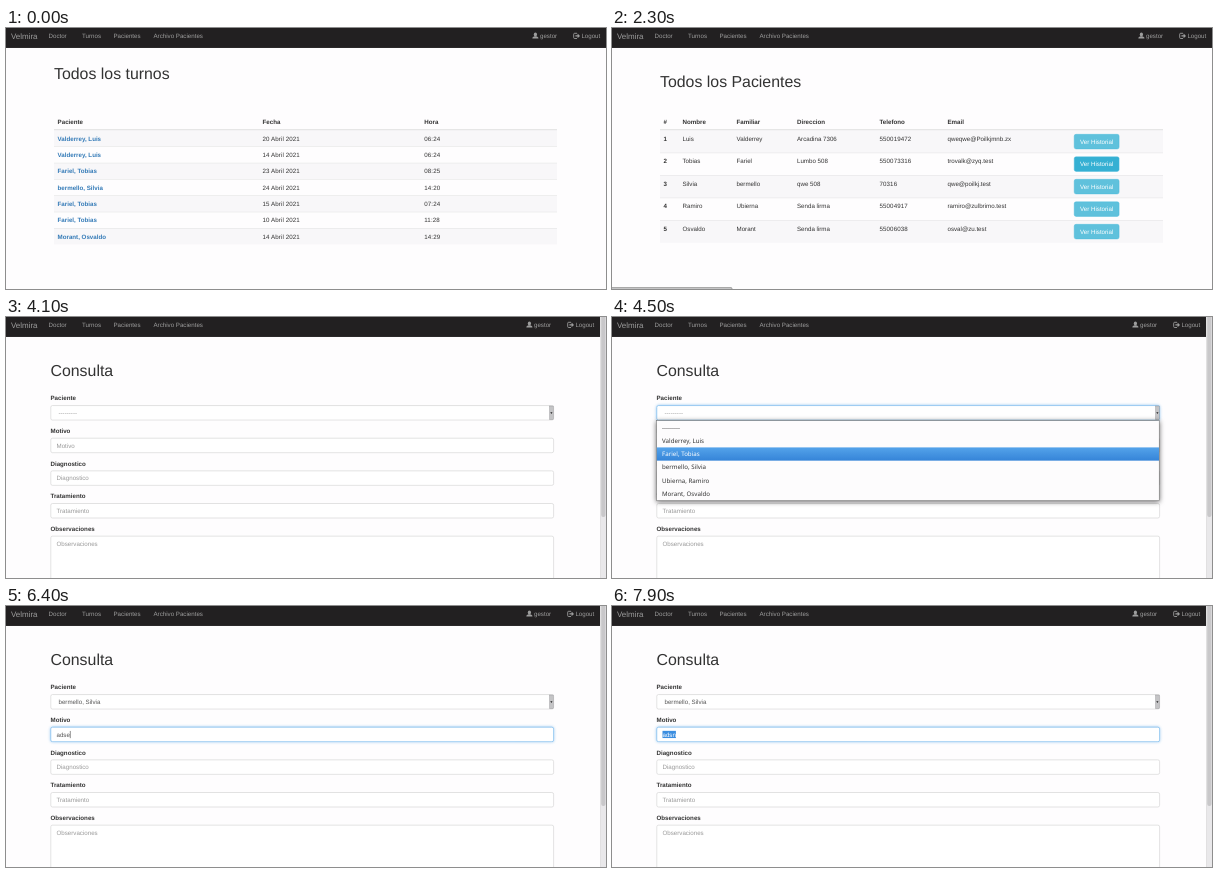
Write an HTML page that moves like this. It is 600 px wide and 261 px high and loops after 8000 ms.

```html
<!DOCTYPE html>
<html lang="es">
<head>
<meta charset="utf-8">
<title>Turnos</title>
<style>
html, body { margin: 0; width: 100%; height: 100%; overflow: hidden; background: #fefdfe; }
svg { display: block; width: 100%; height: 100%; }
text { font: 6.18px "Liberation Sans", Arial, sans-serif; fill: #333; white-space: pre; text-rendering: geometricPrecision; }
.num { letter-spacing: .1px; }
.h1 { font-size: 15.88px; }
.h2 { font-size: 13.2px; }
.b { font-weight: bold; }
.link { font-weight: bold; fill: #337ab7; }
.nav { fill: #9d9d9d; }
.brand { font-size: 7.94px; fill: #9d9d9d; }
.w { fill: #fff; }
.ph { fill: #999; }
.val { fill: #555; }
.pop { font-family: "Noto Sans", sans-serif; }
.shadow { filter: drop-shadow(0 1px 2.4px rgba(0,0,0,.6)); }
</style>
</head>
<body>
<svg id="stage" viewBox="0 0 600 261" preserveAspectRatio="none"></svg>
<script>
const LOOP = 8000, ROW = 16.32, MAX_SCROLL = 80;
const stage = document.getElementById('stage');
const pen = document.createElement('canvas').getContext('2d');
pen.font = '618px "Liberation Sans", Arial, sans-serif';
const widthOf = s => pen.measureText(s).width / 100;

const people = [
  { first: 'Luis', last: 'Valderrey', street: 'Arcadina 7306', phone: '550019472', mail: 'qweqwe@Poilkjmnb.zx' },
  { first: 'Tobias', last: 'Fariel', street: 'Lumbo 508', phone: '550073316', mail: 'trovalk@zyq.test' },
  { first: 'Silvia', last: 'bermello', street: 'qwe 508', phone: '70316', mail: 'qwe@poilkj.test' },
  { first: 'Ramiro', last: 'Ubierna', street: 'Senda lirma', phone: '55004917', mail: 'ramiro@zulbrimo.test' },
  { first: 'Osvaldo', last: 'Morant', street: 'Senda lirma', phone: '55006038', mail: 'osval@zu.test' }
];
const fullName = p => `${p.last}, ${p.first}`;

// Last entry of [time, value] pairs that has started
const at = (t, steps) => steps.reduce((v, s) => t >= s[0] ? s : v);
const clamp = v => Math.max(0, Math.min(1, v));
const ease = v => (v = clamp(v), v * v * (3 - 2 * v));

const rect = (x, y, w, h, fill, more = '') =>
  `<rect x="${x}" y="${y}" width="${w}" height="${h}" fill="${fill}" ${more}/>`;
const text = (x, y, s, cls = '') =>
  `<text x="${x}" y="${y}" class="${cls}${/^\d/.test(s) ? ' num' : ''}">${s}</text>`;

const colours = {
  info: ['#5fc1dc', '#46b8da', '#35b0d3'],
  green: ['#47ae47', '#3fa23f', '#3b983b'],
  amber: ['#e9a94e', '#e6a040', '#e09a36'],
  red: ['#cd3d4b', '#c53441', '#b93440'],
  blue: ['#377bb6', '#2e6da4', '#286090']
};
function button(x, y, w, label, kind, hover) {
  const [fill, edge, dark] = colours[kind];
  return rect(x + .22, y + .22, w - .44, 14.6, hover ? dark : fill, `rx="1.8" stroke="${edge}" stroke-width=".44"`) +
    `<text x="${x + w / 2}" y="${y + 9.6}" class="w" text-anchor="middle">${label}</text>`;
}

function navbar(hover, width) {
  const items = [['Doctor', 42.5], ['Turnos', 76], ['Pacientes', 107.5], ['Archivo Pacientes', 147.5]];
  return rect(0, -100, width, 119.8, '#222021') + rect(0, 19.4, width, .5, '#080808') +
    text(5, 10.6, 'Velmira', 'brand') +
    items.map(([s, x]) => text(x, 10.1, s, s === hover ? 'w' : 'nav')).join('') +
    `<g transform="translate(${width - 600})" fill="#9d9d9d">
      <ellipse cx="529.4" cy="6.5" rx="1.6" ry="2"/>
      <path d="M526.4 10.6v-.9q.1-.7 2.1-1.4h1.8q2 .7 2.1 1.4v.9z"/>
      ${text(534, 10.1, 'gestor', 'nav')}
      <path d="M571 5.3h-2.4q-.9 0-.9.9v3.4q0 .9.9.9h2.4" fill="none" stroke="#9d9d9d" stroke-width=".9"/>
      <path d="M569.4 7.2h2.2v-1.6l2.4 2.3-2.4 2.3v-1.6h-2.2z"/>
      ${text(575.4, 10.1, 'Logout', 'nav')}
    </g>`;
}

// Striped table: heading labels sit at the column positions
function table(top, rowH, cols, heads, rows) {
  const head = heads.map((s, i) => text(cols[i], top - 6.5, s, 'b')).join('');
  const body = rows.map((cells, r) => {
    const y = top + r * rowH;
    return (r % 2 ? '' : rect(48, y, 503, rowH, '#f8f7f9')) +
      (r ? rect(48, y, 503, .44, '#ddd') : '') +
      cells.map((s, i) => text(cols[i], y + 10.5, s, i ? '' : rowH === ROW ? 'link' : 'b')).join('');
  }).join('');
  return head + body + rect(48, top - .9, 503, .9, '#ddd');
}

const statusBar = w => rect(-2, 259.6, w + 2, 4, '#c9c9ca', 'rx="1" stroke="#777" stroke-width=".6"');

function appointments(t) {
  const list = [[0, 20, '06:24'], [0, 14, '06:24'], [1, 23, '08:25'], [2, 24, '14:20'],
    [1, 15, '07:24'], [1, 10, '11:28'], [4, 14, '14:29']];
  const hover = t >= 500;
  return navbar(hover && 'Archivo Pacientes', 600) + text(48, 50.6, 'Todos los turnos', 'h1') +
    table(102.2, ROW, [51.6, 256.5, 418.3], ['Paciente', 'Fecha', 'Hora'],
      list.map(([p, d, h]) => [fullName(people[p]), d + ' Abril 2021', h])) +
    (hover ? statusBar(120) : '');
}

function patients(t) {
  const hover = t < 1400, row = t >= 1800 ? 1 : t >= 1700 ? 0 : -1;
  return navbar(hover && 'Archivo Pacientes', 600) + text(48, 59.3, 'Todos los Pacientes', 'h1') +
    table(102.2, 22.5, [51.6, 70.5, 124.5, 185, 267.5, 335.5],
      ['#', 'Nombre', 'Familiar', 'Direccion', 'Telefono', 'Email'],
      people.map((p, i) => [i + 1 + '', p.first, p.last, p.street, p.phone, p.mail])) +
    people.map((p, i) => button(462, 106.1 + i * 22.5, 45.3, 'Ver Historial', 'info', i === row)).join('') +
    (hover || row >= 0 ? statusBar(120) : '');
}

function history(t) {
  return navbar('', 600) + text(48, 59.3, 'Historial del Paciente: Tobías Fariel', 'h1') +
    text(48, 83, 'Consultas', 'h2') +
    button(48, 100.2, 42.2, 'AGREGAR', 'green', t >= 3600) +
    table(149.6, 22.2, [51.6, 82.6, 154.5, 208.8, 314.8],
      ['Fecha', 'Motivo Consulta', 'Diagnostico', 'Tratamiento', 'Observacion'],
      [['', 'Dolor pie izquierdo', 'Espina oculta', 'Cirujía con anestésico tópico', 'No me permitió que retire el elemento.']]) +
    button(452.5, 152.8, 33.6, 'EDITAR', 'amber') +
    button(487.5, 152.8, 40.6, 'ELIMINAR', 'red') +
    button(48, 180.1, 36, 'VOLVER', 'blue');
}

const fields = ['Paciente', 'Motivo', 'Diagnostico', 'Tratamiento', 'Observaciones'];
const focusSteps = [[0, -1], [4250, 0], [5200, 1], [6900, 2], [7000, 3], [7100, 4], [7500, 3], [7700, 2], [7800, 1]];
const typed = [[0, ''], [5200, ''], [5900, 'a'], [6000, 'ad'], [6200, 'ads'], [6300, 'adse'], [6600, 'ads'], [6700, 'adsn']];
const past = ['asd', 'asdasd', 'ads', 'adsasd'];

function field(i, t) {
  const y = 88.3 + i * 32.65, h = i === 4 ? 94.4 : 15;
  const [since, on] = at(t, focusSteps);
  const before = at(since - 1, focusSteps)[1], k = clamp((t - since) / 90);
  const glow = on === i ? k : before === i ? 1 - k : 0;
  const mix = (a, b) => Math.round(a + (b - a) * glow);
  const edge = `rgb(${mix(204, 102)},${mix(204, 175)},${mix(204, 233)})`;
  const shade = glow ? `style="filter:drop-shadow(0 0 1.7px rgba(102,175,233,${(glow * .75).toFixed(2)}))"` : '';
  let out = text(44.5, y - 5.1, fields[i], 'b') +
    rect(44.8, y + .25, 502.8, h - .5, '#fff', `rx="1.7" stroke="${edge}" stroke-width=".55" ${shade}`);
  const base = y + 9.6;

  if (!i) {
    return out + text(52.5, base, t < 5000 ? '---------' : fullName(people[2]), t < 5000 ? 'ph' : 'val') +
      rect(543.6, y + .7, 3.6, h - 1.4, '#c4c4c6', 'stroke="#8d8d90" stroke-width=".4"') +
      `<path d="M544.3 ${y + 7}h2.2l-1.1 1.6z" fill="#222"/>`;
  }
  const [edit, value] = at(t, typed);
  const s = i === 1 ? value : '', w = s ? widthOf(s) : 0;
  const selected = i === 1 && t >= 7800;
  if (selected) out += rect(50.5, y + 3.9, w, 7.2, '#3b8ee0');
  out += s ? text(50.5, base, s, selected ? 'w' : 'val') : text(50.5, base, fields[i], 'ph');
  const start = i === 1 ? edit : since;
  if (on === i && !selected && (t - start) % 1000 < 500) out += rect(50.5 + w, y + 4, .5, 7.2, '#222');
  return out;
}

function popup(y, items, active) {
  const step = 13.25;
  return rect(44.6, y, 502.6, items.length * step + .6, '#fdfcfd', 'class="shadow" stroke="#666" stroke-width=".5"') +
    items.map((s, i) => (i === active ? rect(44.8, y + .3 + i * step, 502.2, step, 'url(#hot)') : '') +
      text(50, y + 8.9 + i * step, s, i === active ? 'pop w' : 'pop')).join('');
}

function form(t) {
  const scroll = MAX_SCROLL * (ease((t - 6900) / 450) - ease((t - 7400) / 380));
  let out = navbar('', 594) + text(44.5, 59.3, 'Consulta', 'h1') +
    fields.map((f, i) => field(i, t)).join('') +
    button(44.5, 319.8, 43, 'GUARDAR', 'green');
  if (t >= 4300 && t < 5000) {
    const active = at(t, [[4300, 0], [4400, 1], [4500, 2], [4800, 3]])[1];
    out += popup(103.6, ['---------', ...people.map(fullName)], active);
  }
  const value = at(t, typed)[1];
  const hints = value && t < 6300 ? past.filter(s => s.startsWith(value)) : [];
  if (hints.length) out += popup(136.4, hints, -1);
  return `<g transform="translate(0 ${-scroll.toFixed(2)})">${out}</g>` +
    rect(594, 0, 6, 261, '#e9e8ea') + rect(594, 0, .4, 261, '#d4d3d5') +
    rect(595.2, (scroll * 200 / 261 - 4).toFixed(2), 4.3, 204, '#c9c8ca', 'rx="2"');
}

const pages = [[0, appointments], [800, patients], [2500, history], [3900, form]];
const defs = `<defs><linearGradient id="hot" x2="0" y2="1">
  <stop stop-color="#54a3ea"/><stop offset="1" stop-color="#3584d8"/></linearGradient></defs>`;
let shown = '';

function draw(now) {
  const t = now % LOOP;
  const markup = defs + rect(0, 0, 600, 261, '#fefdfe') + at(t, pages)[1](t);
  if (markup !== shown) stage.innerHTML = shown = markup;
}

const origin = performance.now();
function tick() {
  draw(performance.now() - origin);
  requestAnimationFrame(tick);
}
tick();
</script>
</body>
</html>
```
